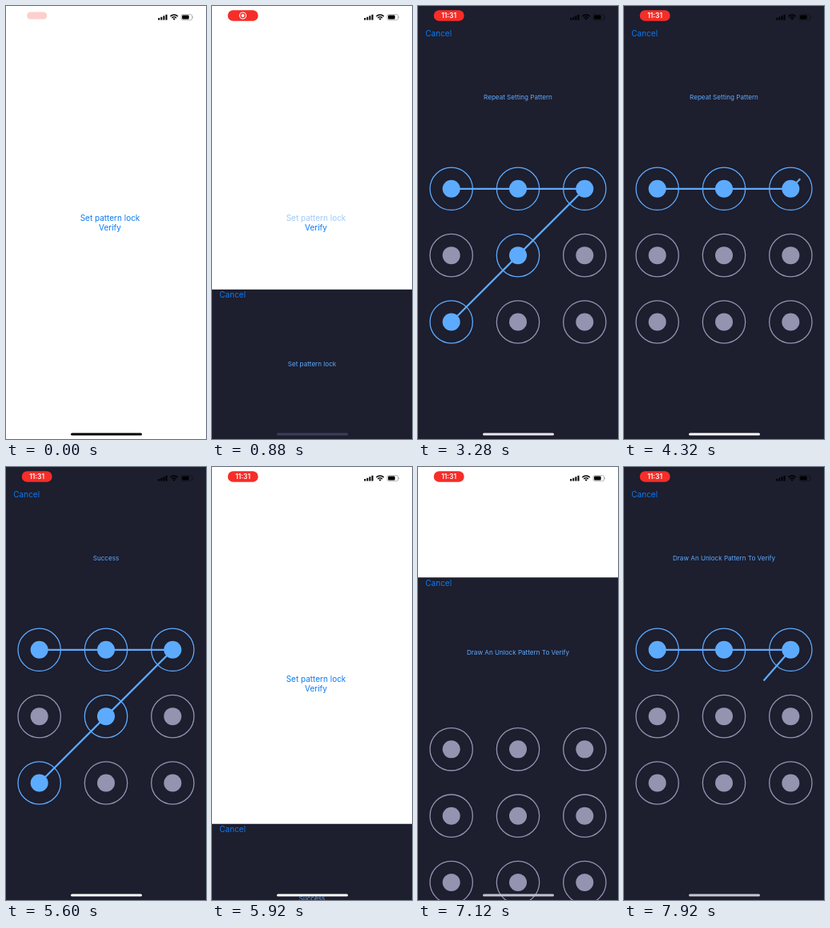
These frames come from a looping animation (250x542 px, 8 s). An HTML page:

```html
<!DOCTYPE html>
<html lang="en">
<head>
<meta charset="utf-8">
<title>Pattern lock</title>
<style>
  html, body { margin: 0; width: 100%; height: 100%; overflow: hidden; background: #fff; }
  svg { display: block; width: 250px; height: 542px; font-family: Inter, Roboto, sans-serif; }
  .link { font-size: 10px; fill: #0a7af5; }
  .mid { text-anchor: middle; }
  .title { font-size: 8.1px; fill: #5dabff; }
  .time { font-size: 8.5px; font-weight: 600; fill: #fff; }
  .ring { fill: none; stroke-width: 1.3; }
  .trace { fill: none; stroke: #5dabff; stroke-width: 2.2; }
</style>
</head>
<body>
<svg viewBox="0 0 250 542">
  <rect width="250" height="542" fill="#fff"/>
  <text id="set" class="link mid" x="130" y="268.6">Set pattern lock</text>
  <text id="verify" class="link mid" x="130" y="281.3">Verify</text>

  <g id="panel">
    <rect width="250" height="560" fill="#1d1e2e"/>
    <text id="cancel" class="link" x="9.3">Cancel</text>
    <text id="title" class="title mid" x="125"></text>
    <g id="grid"><path id="trace" class="trace"/></g>
  </g>

  <g id="pill">
    <rect x="19.7" y="5.3" width="38" height="13.4" rx="6.7" fill="#f62d28"/>
    <g id="rec">
      <circle cx="38.6" cy="12" r="4" fill="none" stroke="#fff" stroke-width="1.1"/>
      <circle cx="38.6" cy="12" r="2" fill="#fff"/>
    </g>
    <text id="clock" class="time mid" x="38.6" y="15.1">11:31</text>
  </g>

  <g id="status">
    <path d="M191.2 17.5v-2.4M194.3 17.5v-3.7M197.4 17.5v-5.2M200.5 17.5v-6.8" stroke="#000" stroke-width="2"/>
    <g fill="none" stroke="#000" stroke-width="1.4">
      <path d="M205.4 12.9a6.6 6.6 0 0 1 9.4 0"/>
      <path d="M207.3 14.9a4 4 0 0 1 5.6 0"/>
    </g>
    <path d="M210.1 17.7l-1.5-1.6a2.1 2.1 0 0 1 3 0z"/>
    <rect x="219" y="10.6" width="13.6" height="7" rx="2" fill="none" stroke="#000" stroke-opacity=".4" stroke-width=".7"/>
    <rect x="220.1" y="11.6" width="8.6" height="5" rx="1.1"/>
    <path d="M233.4 13v2.2a1.2 1.2 0 0 0 0-2.2z" opacity=".45"/>
  </g>
  <rect id="bar" x="81" y="534.4" width="89" height="3" rx="1.5"/>
</svg>

<script>
const LOOP = 8000, HEIGHT = 542, CELL = 250 / 3, BLUE = '#5dabff', GREY = '#9493b0';
const el = id => document.getElementById(id);
const clamp = v => Math.min(1, Math.max(0, v));
const ramp = (t, a, b) => clamp((t - a) / (b - a));
const mix = (a, b, p) => a + (b - a) * p;

// Linear interpolation through [time, value, ...] keys
function sample(keys, t) {
  let i = 1;
  while (i < keys.length - 1 && t > keys[i][0]) i++;
  const a = keys[i - 1], b = keys[i], p = ramp(t, a[0], b[0]);
  return a.slice(1).map((v, k) => mix(v, b[k + 1], p));
}

// Critically damped spring
function spring(t, start) {
  if (t <= start) return 0;
  const w = (t - start) * 0.013, p = 1 - (1 + w) * Math.exp(-w);
  return p > 0.998 ? 1 : p;
}

const nodes = [];
for (let i = 0; i < 9; i++) {
  nodes.push({ x: CELL * (i % 3 + 0.5), y: 228.8 + CELL * Math.floor(i / 3) });
}
const at = (t, n) => [t, nodes[n].x, nodes[n].y, n];

const gestures = [
  { lift: 2820, clear: 3600, keys: [at(1800, 0), at(1960, 1), at(2120, 2),
    [2240, 165, 273], at(2460, 4), at(2720, 6)] },
  { lift: 4960, clear: 6300, keys: [at(3780, 0), at(4000, 1), at(4220, 2),
    [4320, 220.2, 216.4], [4400, 226, 213], [4540, 185, 253], at(4680, 4), at(4860, 6)] },
  { lift: 9000, clear: 9000, keys: [at(7490, 0), at(7630, 1), at(7780, 2),
    [7920, 175, 267], at(8030, 4)] }
];

const titles = [[2820, 'Set pattern lock'], [4960, 'Repeat Setting Pattern'],
  [6500, 'Success'], [LOOP, 'Draw An Unlock Pattern To Verify']];

const barKeys = [[0, 0, 0, 0], [800, 0, 0, 0], [880, 62, 62, 88], [1250, 178, 172, 194],
  [2700, 178, 172, 194], [3500, 255, 255, 255], [5960, 255, 255, 255], [6250, 0, 0, 0],
  [6930, 0, 0, 0], [7120, 196, 194, 208], [LOOP, 200, 197, 212]];

function add(tag, attrs) {
  const e = document.createElementNS('http://www.w3.org/2000/svg', tag);
  for (const k in attrs) e.setAttribute(k, attrs[k]);
  return el('grid').insertBefore(e, el('trace'));
}
for (const n of nodes) {
  n.ring = add('circle', { cx: n.x, cy: n.y, r: 26.67, class: 'ring' });
  n.dot = add('circle', { cx: n.x, cy: n.y, r: 11 });
}

function drawPattern(t) {
  const g = gestures.find(g => t >= g.keys[0][0] && t < g.clear);
  const hit = g ? g.keys.filter(k => k.length > 3 && t >= k[0]) : [];
  const pts = hit.map(k => [k[1], k[2]]);
  if (g && t < g.lift) pts.push(sample(g.keys.map(k => k.slice(0, 3)), t));
  el('trace').setAttribute('d', pts.length ? 'M' + pts.join('L') : '');
  nodes.forEach((n, i) => {
    const color = hit.some(k => k[3] === i) ? BLUE : GREY;
    n.ring.setAttribute('stroke', color);
    n.dot.setAttribute('fill', color);
  });
}

function drawPanel(t) {
  const shown = spring(t, 787) - spring(t, 5677.5) + spring(t, 6916);
  const top = HEIGHT * (1 - shown);
  const inset = clamp(1 - top / 29);
  el('panel').setAttribute('transform', `translate(0 ${top})`);
  el('cancel').setAttribute('y', mix(10.5, 37.7, inset));
  el('title').setAttribute('y', mix(96.4, 116.8, inset));
  el('title').textContent = titles.find(k => t < k[0])[1];
  el('grid').setAttribute('transform', `translate(0 ${mix(-13.7, 0, inset)})`);
}

// Button dims on touch and recovers on release
const press = (t, down) => 1 - 0.8 * (ramp(t, down, down + 80) - ramp(t, down + 140, down + 540));

function draw(t) {
  drawPanel(t);
  drawPattern(t);
  el('set').setAttribute('opacity', press(t, 640));
  el('verify').setAttribute('opacity', press(t, 6770));

  const grow = ramp(t, 0, 360), s = mix(0.66, 1, grow);
  el('pill').setAttribute('transform', `translate(38.7 12) scale(${s}) translate(-38.7 -12)`);
  el('pill').setAttribute('opacity', mix(0.22, 1, grow));
  const swap = ramp(t, 2960, 3200);
  el('rec').setAttribute('opacity', grow * (1 - swap));
  el('clock').setAttribute('opacity', swap);
  el('bar').setAttribute('fill', `rgb(${sample(barKeys, t).map(Math.round)})`);
}

const begin = performance.now();
function tick() {
  draw((performance.now() - begin) % LOOP);
  requestAnimationFrame(tick);
}
tick();
</script>
</body>
</html>
```
